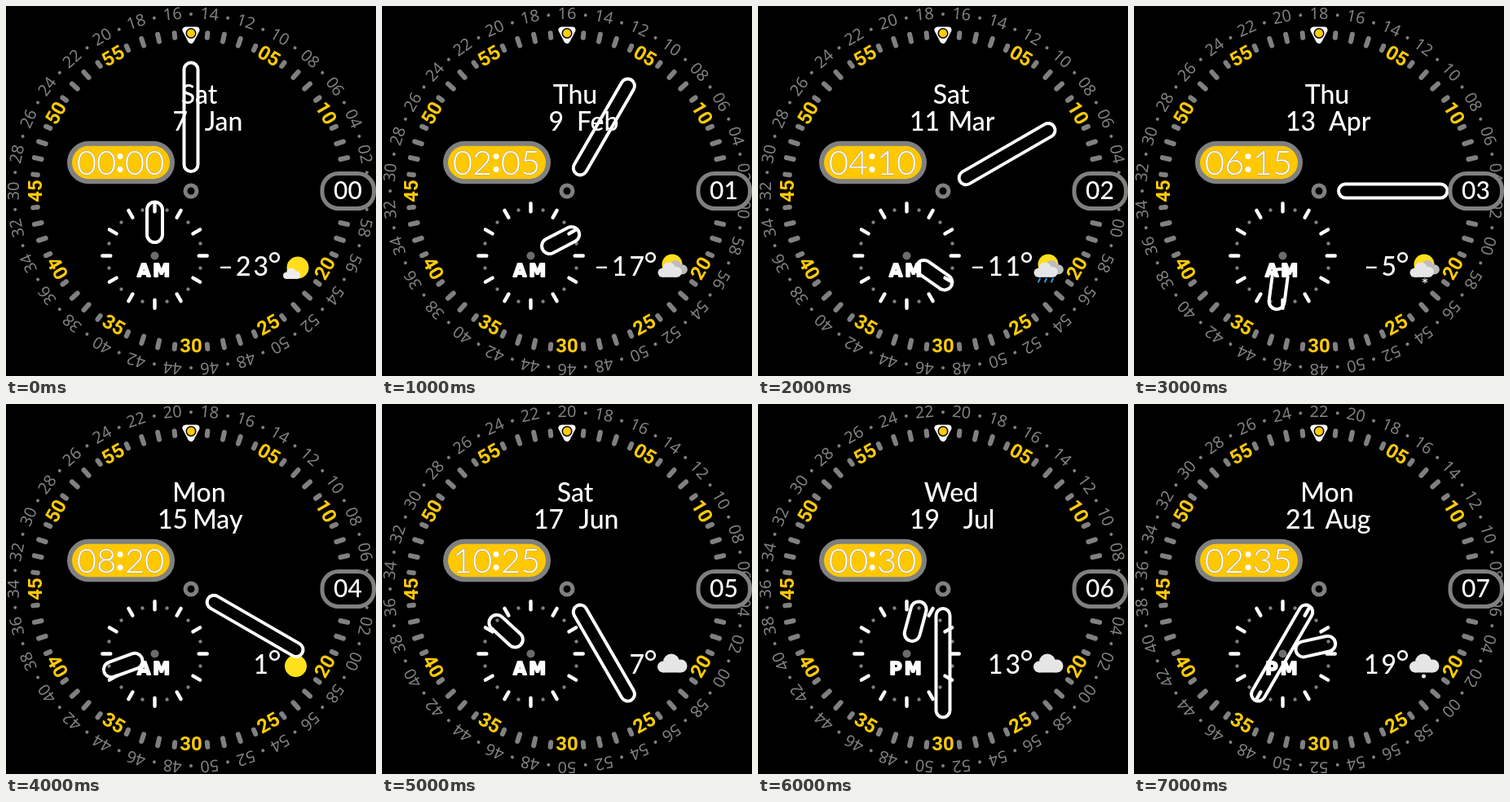
An HTML page with a canvas for the animation above (8 s loop, 454 px wide and 454 px high).

```html
<!DOCTYPE html>
<html>
<head>
<meta charset="utf-8">
<style>
html, body { margin: 0; width: 100%; height: 100%; overflow: hidden; background: #000; }
canvas { display: block; width: 454px; height: 454px; }
</style>
</head>
<body>
<canvas id="face" width="454" height="454"></canvas>
<script>
const ctx = document.getElementById('face').getContext('2d');
const GREY = '#808080', YELLOW = '#ffcb05', WHITE = '#fff', CLOUD = '#e6e6e6';
const C = 227, RAD = Math.PI / 180;
const pad = n => String(n).padStart(2, '0');

function circle(x, y, r, color) {
  ctx.fillStyle = color;
  ctx.beginPath();
  ctx.arc(x, y, r, 0, 7);
  ctx.fill();
}

function box(x, y, w, h, r, stroke, width, fill) {
  ctx.beginPath();
  ctx.roundRect(x, y, w, h, r);
  if (fill) { ctx.fillStyle = fill; ctx.fill(); }
  ctx.strokeStyle = stroke;
  ctx.lineWidth = width;
  ctx.stroke();
}

function line(x1, y1, x2, y2, width, color) {
  ctx.strokeStyle = color;
  ctx.lineWidth = width;
  ctx.lineCap = 'round';
  ctx.beginPath();
  ctx.moveTo(x1, y1);
  ctx.lineTo(x2, y2);
  ctx.stroke();
}

function text(str, x, y, font, color, align = 'center') {
  ctx.font = font;
  ctx.fillStyle = color;
  ctx.textAlign = align;
  ctx.fillText(str, x, y);
}

// Runs draw with the origin at (x, y), turned clockwise by deg.
function turned(x, y, deg, draw) {
  ctx.save();
  ctx.translate(x, y);
  ctx.rotate(deg * RAD);
  draw();
  ctx.restore();
}

function secondsRing(sec) {
  for (let n = 0; n < 60; n++) {
    turned(C, C, 90 + (sec - n) * 6, () => {
      if (n % 2) circle(0, -217, 2, GREY);
      else text(pad(n), 0, -211.5, '20px "Noto Sans", sans-serif', GREY);
    });
  }
}

function minuteRing() {
  for (let m = 1; m < 60; m++) {
    const deg = m * 6, step = m % 5;
    if (step) {
      const half = step === 1 || step === 4 ? 2.8 : 4.5;
      turned(C, C, deg, () => line(0, -192 - half, 0, -192 + half, 6, GREY));
    } else if (m !== 15) {
      const flip = deg > 90 && deg < 270 ? 180 : 0;
      turned(C + 190.5 * Math.sin(deg * RAD), C - 190.5 * Math.cos(deg * RAD), deg + flip, () =>
        text(pad(m), 0, 7.3, '700 24px Roboto, sans-serif', YELLOW));
    }
  }
}

function marker() {
  ctx.beginPath();
  ctx.moveTo(220.5, 29.5);
  ctx.lineTo(233.5, 29.5);
  ctx.lineTo(227, 42);
  ctx.closePath();
  ctx.lineJoin = 'round';
  ctx.lineWidth = 8;
  ctx.strokeStyle = ctx.fillStyle = WHITE;
  ctx.stroke();
  ctx.fill();
  circle(227, 33.5, 6.5, '#000');
  circle(227, 33.5, 5, YELLOW);
}

function hourDial(pm) {
  for (let k = 0; k < 24; k++) {
    turned(182.5, 306.5, k * 15, () => {
      if (k % 2) circle(0, -58, 2.2, GREY);
      else line(0, -64.2, 0, -54.2, 4.4, WHITE);
    });
  }
  circle(182.5, 306.5, 5, '#6c6c6c');
  const label = pm ? 'PM' : 'AM';
  ctx.letterSpacing = '3px';
  text(label, 182.5, 332.3, 'bold 21px "DejaVu Sans", sans-serif', WHITE);
  ctx.strokeStyle = WHITE;
  ctx.lineWidth = 2;
  ctx.strokeText(label, 182.5, 332.3);
  ctx.letterSpacing = '0px';
}

function hand(x, y, deg, from, to, width) {
  turned(x, y, deg, () =>
    box(-width / 2, -to + 2, width, to - from - 4, width / 2, WHITE, 4));
}

function timePill(hour, minute) {
  box(78, 168.7, 126, 46.6, 23.3, GREY, 6, '#ffc800');
  ctx.strokeStyle = '#a8a090';
  ctx.lineWidth = 1;
  [[hour, 111], [minute, 170]].forEach(([n, x]) => {
    const font = '300 42px Lato, sans-serif';
    ctx.font = font;
    ctx.textAlign = 'center';
    ctx.strokeText(pad(n), x, 207);
    text(pad(n), x, 207, font, WHITE);
  });
  circle(140, 184.5, 3.5, WHITE);
  circle(140, 200.5, 3.5, WHITE);
}

function dateText(date) {
  const part = opts => date.toLocaleDateString('en-US', opts);
  const font = '500 32px Lato, sans-serif';
  text(part({ weekday: 'short' }), 237, 119.8, font, WHITE);
  text(date.getDate(), 223, 152.5, font, WHITE, 'right');
  text(part({ month: 'short' }), 290.5, 152.5, font, WHITE, 'right');
}

function cloud(x, y, s, color) {
  turned(x, y, 0, () => {
    ctx.scale(s, s);
    circle(-11, 4, 7, color);
    circle(-1, -2, 10, color);
    circle(10.5, 3, 8, color);
    ctx.fillRect(-11, 2, 21.5, 9);
  });
}

function sunCloud() {
  circle(356, 317, 12.5, '#ffdf1b');
  cloud(361, 321, 0.75, '#bdbdbd');
  cloud(353, 324, 0.8, CLOUD);
}

const skies = [
  () => { circle(358, 321, 13.5, '#ffdf1b'); cloud(350.5, 328.5, 0.58, '#eee'); },
  sunCloud,
  () => {
    sunCloud();
    for (let x = 346; x < 368; x += 8) line(x, 334.5, x - 2, 338.5, 1.8, '#29a9e8');
  },
  () => {
    sunCloud();
    for (let a = 0; a < 180; a += 60) turned(357, 337, a, () => line(0, -3, 0, 3, 1.2, CLOUD));
  },
  () => circle(355.5, 321.5, 13.5, '#ffe11b'),
  () => cloud(356, 318.5, 1, CLOUD),
  () => cloud(356, 318.5, 1, CLOUD),
  () => { cloud(356, 318.5, 1, CLOUD); circle(355.5, 334, 2.5, CLOUD); }
];

function weather(step) {
  const temp = -23 + 6 * step;
  ctx.letterSpacing = '3px';
  text((temp < 0 ? '–' : '') + Math.abs(temp), 325, 331, '500 32px Lato, sans-serif', WHITE, 'right');
  ctx.letterSpacing = '0px';
  text('°', 329.5, 331, '40px Lato, sans-serif', WHITE);
  skies[step]();
}

function render(step) {
  const minutes = step * 125, minute = minutes % 60, hour = Math.floor(minutes / 60);
  ctx.fillStyle = '#000';
  ctx.fillRect(0, 0, 454, 454);
  secondsRing(step);
  minuteRing();
  marker();
  timePill(hour % 12, minute);
  hourDial(hour >= 12);
  dateText(new Date(2023, step, 7 + 2 * step));
  weather(step);
  hand(182.5, 306.5, minutes / 2, 14.5, 68, 19);
  hand(C, C, minute * 6, 22, 159.5, 17);
  box(C - 7, C - 7, 14, 14, 7, GREY, 5);
  box(388, 205.5, 63.5, 43, 20, GREY, 5, '#000');
  text(pad(step), 419.5, 237, '500 30px Lato, sans-serif', WHITE);
}

let shown = -1;
function tick() {
  const step = Math.floor(performance.now() / 1000) % 8;
  if (step !== shown) render(shown = step);
  requestAnimationFrame(tick);
}
tick();
</script>
</body>
</html>
```
